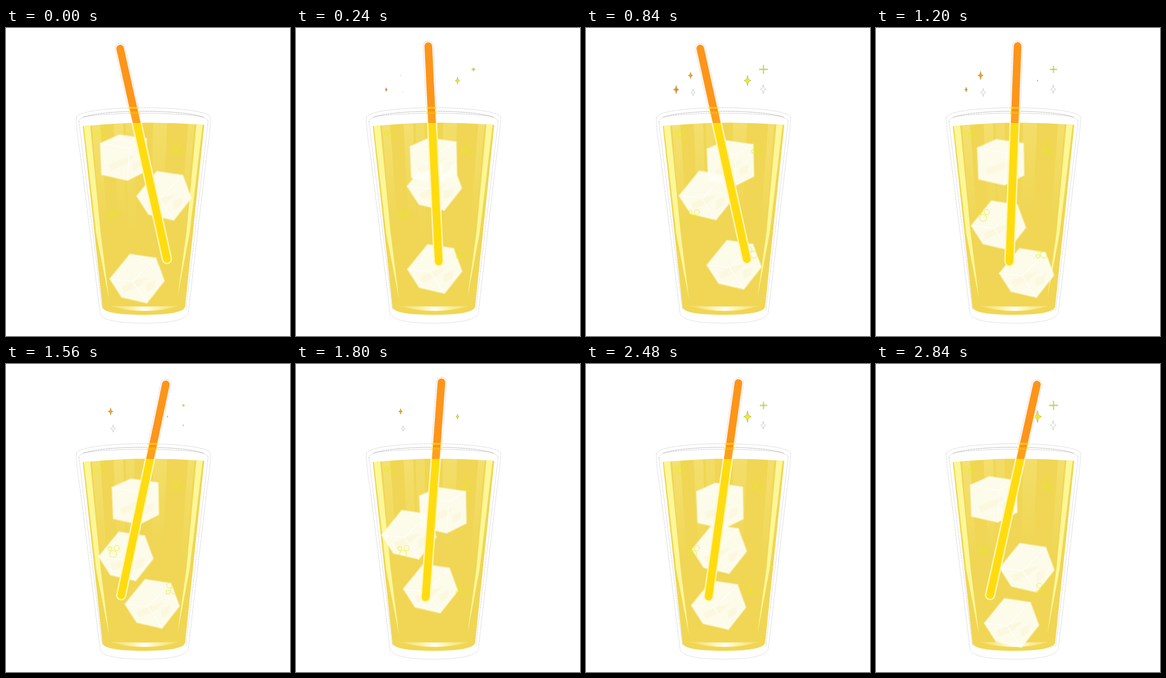
Write an HTML page with a canvas that moves like this. It is 444 px wide and 480 px high and loops after 2880 ms.

```html
<!DOCTYPE html>
<html lang="en">
<head>
<meta charset="utf-8">
<title>Iced drink</title>
<style>
html, body { margin: 0; width: 100%; height: 100%; overflow: hidden; background: #fff; }
canvas { display: block; width: 444px; height: 480px; }
</style>
</head>
<body>
<canvas id="stage" width="444" height="480"></canvas>
<script>
const ctx = document.getElementById('stage').getContext('2d');
const LOOP = 2880, STEP = 40;

// The straw turns at these times, from side to side.
const TURNS = [0, 560, 850, 1480, 2300, 2550];
const REACH = 37, HALF = 174;

// The ice glides from stop to stop on shared beats.
const BEATS = [0, 480, 1350, 2040, 2840];
const BLOCK = [[-36, -21], [-7, -34], [35, -28], [36, 21], [6, 36], [-34, 27]];
const HEX = [[-42, 0], [-11, -38], [29, -32], [42, 3], [15, 37], [-24, 28]];
const CUBES = [
  { shape: HEX, hub: [-7, 4], stops: [[205, 391], [229, 361], [236, 384], [201, 338], [212, 404]] },
  { shape: HEX, hub: [-7, 4], stops: [[247, 262], [186, 231], [192, 314], [171, 249], [236, 318]] },
  { shape: BLOCK, hub: [9, -13], stops: [[184, 201], [246, 211], [191, 208], [244, 234], [184, 210]] }
];

// Each burst is [birth, life] in ms.
const SPARKLES = [
  { x: 141, y: 96, r: 6.5, color: '#f28c22', bursts: [[0, 1500]] },
  { x: 163.5, y: 74, r: 6.5, color: '#f2a126', bursts: [[200, 2100]] },
  { x: 167.5, y: 100.5, r: 6.5, color: '#fff', bursts: [[200, 2100]] },
  { x: 252.5, y: 82, r: 9.5, color: '#eef01e', bursts: [[0, 1250], [1450, 2600]] },
  { x: 277.5, y: 64.5, r: 7, plus: true, bursts: [[0, 1700], [1900, 1900]] },
  { x: 277, y: 95.5, r: 7.5, color: '#fff', bursts: [[300, 1350], [1900, 1900]] }
];

const wave = u => (1 - Math.cos(Math.PI * u)) / 2;

// Segment of a time list, with the eased share of it that has passed.
function locate(times, t) {
  let i = 0;
  while (i < times.length - 2 && t >= times[i + 1]) i++;
  const u = Math.min(1, (t - times[i]) / (times[i + 1] - times[i]));
  return [i, wave(u)];
}

function swing(t) {
  const [i, u] = locate(TURNS, t);
  return REACH * (i % 2 ? 1 - 2 * u : 2 * u - 1);
}

function glide(stops, t) {
  const [i, u] = locate(BEATS, t);
  return [0, 1].map(k => stops[i][k] + (stops[i + 1][k] - stops[i][k]) * u);
}

function shade(points, style) {
  ctx.beginPath();
  points.forEach(([x, y]) => ctx.lineTo(x, y));
  ctx.closePath();
  ctx.fillStyle = style;
  ctx.fill();
}

function dotted(path, color = '#b8b8b8') {
  ctx.save();
  ctx.setLineDash([1, 1.6]);
  ctx.strokeStyle = color;
  ctx.stroke(path);
  ctx.restore();
}

const liquid = new Path2D(
  'M120 153 Q215 143 310 151 L280 435 Q276 447 215 447 Q156 447 151 436 Z');
const outerGlass = new Path2D(
  'M110 140 C112 119 318 119 320 140 Q319 165 314 196 L285 444 Q280 460 215 460 Q150 460 147 444 L116 196 Q110 160 110 140 Z');
const innerGlass = new Path2D(
  'M114 146 C114 124 316 124 316 146 L281 440 M114 146 L151 440');
const rim = new Path2D(
  'M121 139 C150 127 280 127 309 139 M121 139 C150 131 280 131 309 139');

function drawGlass() {
  ctx.lineWidth = 1;
  dotted(outerGlass);
  dotted(innerGlass);
  dotted(rim, '#a8a8a8');
}

// A band of light that follows the slope of the glass.
function ray(x, width, length, alpha) {
  const lean = (215 - x) / 950 * length;
  const g = ctx.createLinearGradient(0, 146, 0, 146 + length);
  g.addColorStop(0, `rgba(255,246,170,${alpha})`);
  g.addColorStop(1, 'rgba(255,246,170,0)');
  shade([[x, 146], [x + width, 146],
    [x + width * 0.8 + lean, 146 + length], [x + lean, 146 + length]], g);
}

function drawLiquid() {
  ctx.save();
  ctx.fillStyle = '#f0d654';
  ctx.fill(liquid);
  ctx.clip(liquid);
  ray(134, 13, 160, 0.35);
  ray(168, 15, 150, 0.3);
  ray(187, 14, 180, 0.2);
  ray(230, 22, 140, 0.25);
  ray(285, 10, 160, 0.3);
  shade([[121, 146], [131, 146], [148, 320], [161, 422], [141, 320]], '#fcf798');
  shade([[298, 146], [308, 146], [287, 320], [268, 420], [282, 320]], '#fcf798');

  ctx.beginPath();
  ctx.moveTo(162, 433);
  ctx.quadraticCurveTo(217, 449, 271, 433);
  ctx.quadraticCurveTo(217, 435, 162, 433);
  const shine = ctx.createRadialGradient(217, 438, 2, 217, 438, 54);
  shine.addColorStop(0, '#fffdec');
  shine.addColorStop(1, 'rgba(255,246,170,.2)');
  ctx.fillStyle = shine;
  ctx.fill();
  ctx.restore();
}

function drawCube({ shape, hub, stops }, t) {
  ctx.save();
  ctx.translate(...glide(stops, t));
  ctx.lineJoin = ctx.lineCap = 'round';
  shade(shape, 'rgba(254,254,246,.92)');
  ctx.lineWidth = 3;
  ctx.strokeStyle = 'rgba(255,255,246,.55)';
  ctx.stroke();
  // Soft reflections inside the ice.
  shade([[-24, 12], [-4, 3], [18, -3], [2, 12], [-20, 21]], 'rgba(250,243,208,.4)');
  shade([[14, 8], [29, 2], [27, 14], [15, 22]], 'rgba(250,243,208,.35)');
  ctx.beginPath();
  [0, 2, 4].forEach(i => {
    ctx.moveTo(...hub);
    ctx.lineTo(...shape[i]);
  });
  ctx.lineWidth = 1.5;
  ctx.strokeStyle = 'rgba(255,255,253,.8)';
  ctx.stroke();
  ctx.restore();
}

// Three touching rings, the largest one at the given angle.
function drawBubbles(x, y, degrees) {
  ctx.strokeStyle = 'rgba(232,236,24,.6)';
  ctx.lineWidth = 1.2;
  [5.5, 4, 3].forEach((r, i) => {
    const a = degrees * Math.PI / 180 - i * Math.PI * 0.7;
    ctx.beginPath();
    ctx.arc(x + 6 * Math.cos(a), y + 6 * Math.sin(a), r, 0, Math.PI * 2);
    ctx.stroke();
  });
}

function drawSparkle({ x, y, r, color, plus, bursts }, t) {
  const live = bursts.find(([birth, life]) => t > birth && t < birth + life);
  if (!live) return;
  const size = r * Math.sin(Math.PI * (t - live[0]) / live[1]);
  ctx.save();
  ctx.translate(x, y);
  if (plus) {
    ctx.beginPath();
    ctx.moveTo(-size, 0);
    ctx.lineTo(size, 0);
    ctx.moveTo(0, -size);
    ctx.lineTo(0, size);
    ctx.strokeStyle = '#c3d25c';
    ctx.lineWidth = 1.8;
  } else {
    const star = [];
    for (let i = 0; i < 8; i++) {
      const a = i * Math.PI / 4, d = i % 2 ? size * 0.38 : size;
      star.push([0.65 * d * Math.cos(a), d * Math.sin(a)]);
    }
    shade(star, color);
    ctx.lineWidth = 0.7;
    ctx.strokeStyle = color === '#fff' ? '#c2c2c2' : 'rgba(120,100,20,.5)';
  }
  ctx.stroke();
  ctx.restore();
}

function bar(half, width) {
  const p = new Path2D();
  p.roundRect(-width / 2, -half, width, half * 2, width / 2);
  return p;
}

function drawStraw(t) {
  const angle = Math.asin(swing(t) / 170);
  const core = bar(HALF, 12), edge = bar(HALF + 2, 16);
  const band = (y0, y1, fill, outline) => {
    ctx.save();
    ctx.beginPath();
    ctx.rect(0, y0, 444, y1 - y0);
    ctx.clip();
    ctx.translate(215, 196);
    ctx.rotate(angle);
    ctx.fillStyle = outline;
    ctx.fill(edge);
    ctx.lineWidth = 1;
    if (y0 === 0) dotted(edge);
    ctx.fillStyle = fill;
    ctx.fill(core);
    ctx.restore();
  };
  band(0, 123, '#fd951a', '#fff');
  band(123, 126, '#ffc31c', '#fff04a');
  band(126, 130, '#f99318', '#fff8d8');
  band(130, 134, '#fdab20', '#fff04a');
  band(134, 148, '#fca01c', '#fff8e8');
  band(148, 480, '#ffdc10', '#fdf7bb');
}

function draw(t) {
  ctx.fillStyle = '#fff';
  ctx.fillRect(0, 0, 444, 480);
  drawGlass();
  drawLiquid();
  CUBES.forEach(c => drawCube(c, t));
  drawBubbles(147, 163, 63);
  drawBubbles(267, 189, 40);
  drawBubbles(168, 290, 95);
  drawBubbles(257, 351, 20);
  SPARKLES.forEach(s => drawSparkle(s, t));
  drawStraw(t);
}

const start = performance.now();
function tick() {
  const t = (performance.now() - start) % LOOP;
  draw(Math.floor(t / STEP) * STEP);
  requestAnimationFrame(tick);
}
tick();
</script>
</body>
</html>
```
